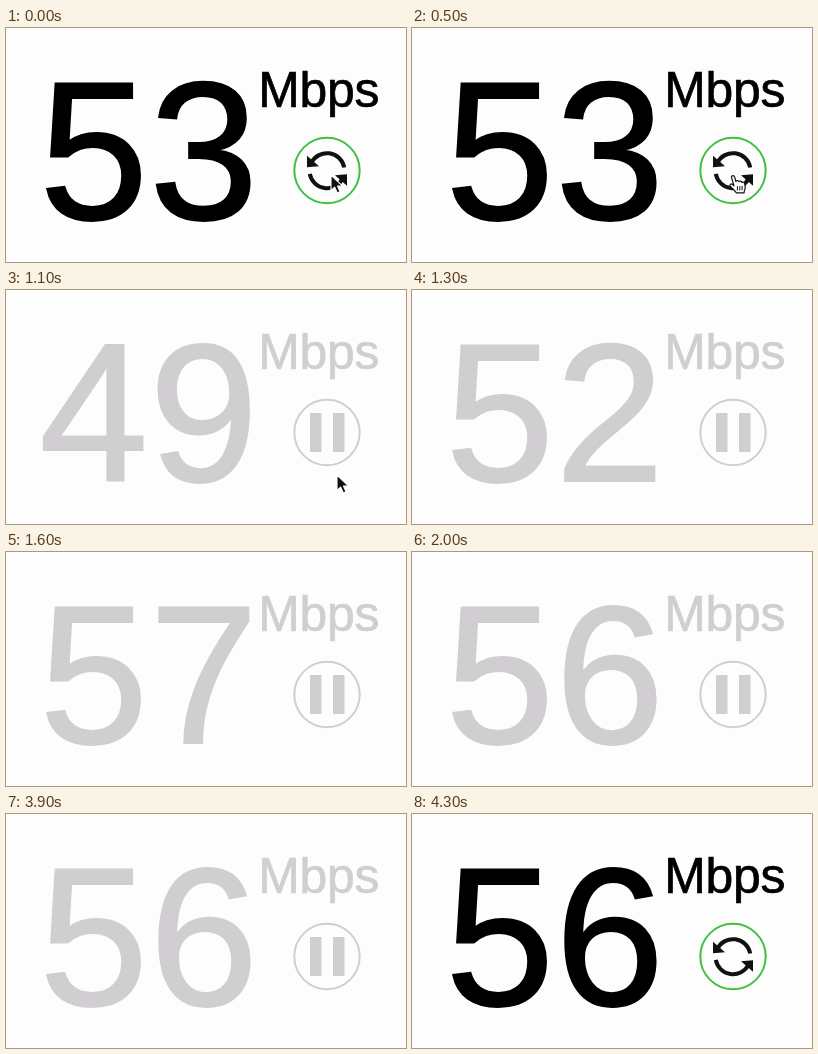
Recreate the animation shown at these times as an HTML page. Size 400 px wide and 234 px high, loop 6.1 s.

```html
<!DOCTYPE html>
<html lang="en">
<head>
<meta charset="utf-8">
<title>Speed test</title>
<style>
  html, body { margin: 0; width: 100%; height: 100%; overflow: hidden; background: #fefdfe; }
  svg { display: block; width: 400px; height: 234px; }
  text { font-family: "Liberation Sans", Arial, Helvetica, sans-serif; fill: currentColor; stroke: currentColor; }
  #stage { color: #000; --ring: #3fc13f; }
  #stage.busy { color: #d0ced0; --ring: #d0ced0; }
  .digit { font-size: 196px; text-anchor: middle; stroke-width: 1.8px; }
  .unit { font-size: 49.8px; letter-spacing: -.2px; stroke-width: .7px; }
  .ring { fill: none; stroke: var(--ring); stroke-width: 2; }
  .busy .reload, .pause { display: none; }
  .busy .pause { display: inline; }
</style>
</head>
<body>
<svg id="stage" viewBox="0 0 400 234">
  <defs>
    <g id="half">
      <path d="M-15.6 -8A17.5 17.5 0 0 1 17.2 -3.2" fill="none" stroke="#111" stroke-width="4"/>
      <path d="M-20 -15V-3.5L-8 -4.5Z" fill="#111"/>
    </g>
  </defs>
  <text id="tens" class="digit" x="87.7" y="191">5</text>
  <text id="ones" class="digit" x="197.7" y="191">3</text>
  <text class="unit" x="252.2" y="79">Mbps</text>
  <circle class="ring" cx="321" cy="142.5" r="32.7"/>
  <g class="reload" transform="translate(321 142.7)">
    <use href="#half"/>
    <use href="#half" transform="rotate(180)"/>
  </g>
  <path class="pause" fill="currentColor" d="M304 123h11.5v39H304zM327 123h11.5v39H327z"/>
  <path id="arrow" d="M0 0V15.5L3.7 12.1L6.3 18L9 16.8L6.5 11.1H11.6Z"
    fill="#111" stroke="#fff" stroke-width="1.1" stroke-linejoin="round"/>
  <g id="hand" fill="#fff" stroke="#111" stroke-width="1.2" stroke-linejoin="round" stroke-linecap="round">
    <path d="M-1.6 1.4C-1.2 -.4 1 -.4 1.6 1.4L2.9 6C3.4 4.6 5.6 4.7 6 6.2C6.8 5.2 8.5 5.5 8.9 6.9C10 6.2 11.5 6.7 11.7 8.2L12.2 11.4C12.4 13.5 11.2 14.8 11 17.4H3.2C2.4 15 -1.2 12.9 -2.8 10.5C-3.6 9 -1.8 7.8 -.4 9L1 10.4Z"/>
    <path d="M4.4 11.2V14.6M6.8 11V14.6M9.1 10.8V14.4" fill="none" stroke-width="1"/>
  </g>
</svg>
<script>
const LOOP = 6100;
const $ = id => document.getElementById(id);

// [start ms, speed]
const speeds = [
  [0, 53], [900, 44], [1000, 47], [1100, 49], [1200, 51], [1300, 52], [1400, 53],
  [1500, 55], [1600, 57], [1700, 58], [1800, 57], [2000, 56], [3500, 57], [3900, 56]
];

// [start ms, pointer, x, y]
const pointers = [
  [0, "arrow", 325, 147], [100, "arrow", 325, 149], [200, "arrow", 325, 151],
  [400, "hand", 321, 149], [500, "hand", 321, 147.5],
  [1000, "hand", 324, 158], [1100, "arrow", 331, 185], [1200, "arrow", 338, 217],
  [1300, "", 0, 0]
];

const at = (steps, t) => steps.findLast(s => s[0] <= t);

function draw(t) {
  const [tens, ones] = String(at(speeds, t)[1]);
  $("tens").textContent = tens;
  $("ones").textContent = ones;
  $("stage").classList.toggle("busy", t >= 800 && t < 4200);

  const [, shape, x, y] = at(pointers, t);
  for (const id of ["arrow", "hand"]) {
    $(id).style.display = id === shape ? "inline" : "none";
    $(id).setAttribute("transform", `translate(${x} ${y})`);
  }
}

const start = performance.now();
function tick() {
  draw((performance.now() - start) % LOOP);
  requestAnimationFrame(tick);
}
tick();
</script>
</body>
</html>
```
